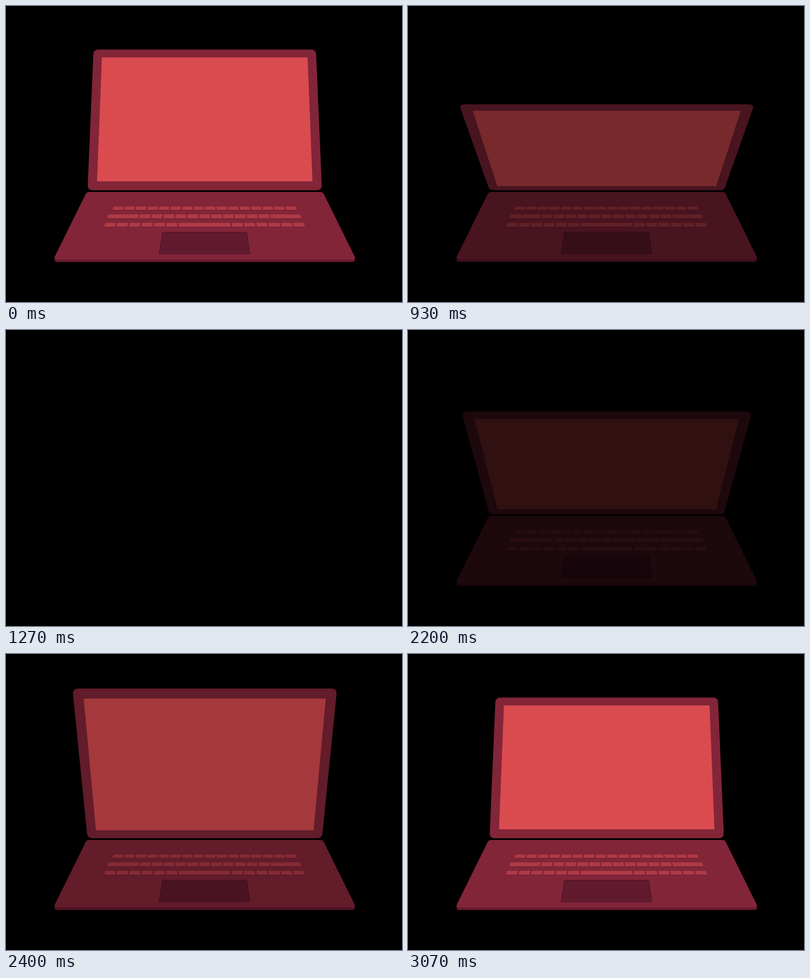
An HTML page for the animation above (3.67 s loop, 800 by 600 pixels).

```html
<!DOCTYPE html>
<html lang="en">
<head>
<meta charset="utf-8">
<title>Laptop</title>
<style>
  html, body { margin: 0; width: 100%; height: 100%; overflow: hidden; background: #000; }
  svg { display: block; width: 100%; height: 100%; }
</style>
</head>
<body>
<svg viewBox="0 0 800 600">
  <g id="laptop">
    <path fill="#661a2e" d="M99 513H704Q705 514 704.7 516Q704 519 700 519H103Q99 519 98.3 516Q98 514 99 513Z"/>
    <path fill="#822538" d="M168 377H635Q640 377 642 381L704.5 508Q706.5 514 701 514H102Q96.5 514 98.5 508L161 381Q163 377 168 377Z"/>
    <path id="shade" fill="#651a2d" transform="translate(.4 1)"/>
    <path id="keys" fill="#b03a47"/>
    <path fill="#621a2e" d="M316 458H486.5L493 503.5H309Z"/>
    <path fill="none" stroke="#4a1023" d="M309.5 503L316.4 458.5H486.2L492.5 503"/>
    <path id="lid" fill="#822538"/>
    <path id="screen" fill="#da4b50"/>
  </g>
</svg>
<script>
const LOOP = 3670, FPS = 15;
const CX = 401.5, HINGE = 373.5, DEPTH = 1343;
const LID = { w: 236.8, h: 309.5, r: 11 };
const BEZEL = 18.5;
const OPEN = -13.6, SHUT = 70;

const $ = id => document.getElementById(id);
const clamp = x => Math.max(0, Math.min(1, x));
const span = (f, from, to) => clamp((f - from) / (to - from));
const smooth = x => x * x * (3 - 2 * x);
const pt = (x, y) => x.toFixed(2) + ' ' + y.toFixed(2);

// Timing curve with handles (a, 0) and (b, 1).
function ease(x, a, b) {
  let lo = 0, hi = 1;
  for (let i = 0; i < 24; i++) {
    const s = (lo + hi) / 2, q = 1 - s;
    if (3 * a * s * q * q + 3 * b * s * s * q + s * s * s < x) lo = s; else hi = s;
  }
  return smooth((lo + hi) / 2);
}

// Key sides converge on a point above the stage.
function key(x, w, top, bottom) {
  const k = (top + 110) / (bottom + 110);
  const up = v => CX + (v - CX) * k;
  return `M${pt(x, bottom)}L${pt(up(x), top)}L${pt(up(x + w), top)}L${pt(x + w, bottom)}Z`;
}

function keyRun(n, x, pitch, w, top, bottom) {
  let d = '';
  for (let i = 0; i < n; i++) d += key(x + i * pitch, w, top, bottom);
  return d;
}

const keys =
  keyRun(16, 215, 23.42, 20.8, 406.5, 413.5) +
  key(204.5, 62, 422.5, 430.5) +
  keyRun(11, 269, 24.25, 21.7, 422.5, 430.5) +
  key(535.5, 61.5, 422.5, 430.5) +
  keyRun(6, 198, 25.1, 22, 439.5, 447.5) +
  key(348.5, 105, 439.5, 447.5) +
  keyRun(6, 456.8, 25.1, 22, 439.5, 447.5);
$('keys').setAttribute('d', keys);
$('shade').setAttribute('d', keys);

function drawLid(angle) {
  const sin = Math.sin(angle * Math.PI / 180), cos = Math.cos(angle * Math.PI / 180);
  const at = (x, up) => {
    const s = 1 / (1 - up * sin / DEPTH);
    return pt(CX + x * s, HINGE - up * cos * s);
  };
  const { w, h, r } = LID;
  $('lid').setAttribute('d',
    `M${at(r - w, h)}L${at(w - r, h)}Q${at(w, h)} ${at(w, h - r)}` +
    `L${at(w, r)}Q${at(w, 0)} ${at(w - r, 0)}` +
    `L${at(r - w, 0)}Q${at(-w, 0)} ${at(-w, r)}` +
    `L${at(-w, h - r)}Q${at(-w, h)} ${at(r - w, h)}Z`);
  const sw = w - BEZEL, top = h - BEZEL;
  $('screen').setAttribute('d',
    `M${at(-sw, top)}L${at(sw, top)}L${at(sw, BEZEL)}L${at(-sw, BEZEL)}Z`);
}

function draw(ms) {
  const f = Math.floor((ms + 4) * FPS / 1000);
  const shut = ease(span(f, 11, 14.96), 0.3, 0.473) - ease(span(f, 28.7, 46), 0.427, 0.388);
  const fadeOut = smooth(span(f, 11, 17.45));
  const fadeIn = 1 - (1 - span(f, 32.08, 39.83)) ** 2;
  drawLid(OPEN + (SHUT - OPEN) * shut);
  $('laptop').setAttribute('opacity', clamp(1 - fadeOut + fadeIn).toFixed(3));
}

const start = performance.now();
function tick() {
  draw((performance.now() - start) % LOOP);
  requestAnimationFrame(tick);
}
tick();
</script>
</body>
</html>
```
